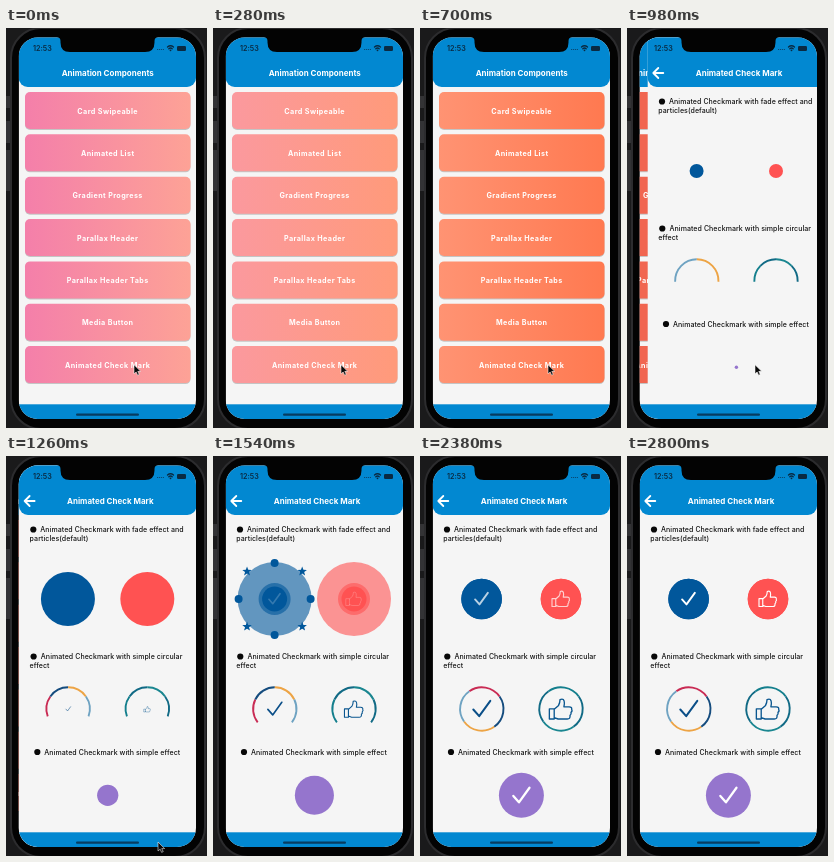
Animation of 201x400 px, one loop 2.94 s. Source, as an HTML page:

```html
<!DOCTYPE html>
<html lang="en">
<head>
<meta charset="utf-8">
<title>Animated components</title>
<style>
html, body { margin: 0; width: 100%; height: 100%; overflow: hidden; background: #1a1a1b; }
svg { display: block; width: 201px; height: 400px; }
text { font-family: Inter, Roboto, sans-serif; }
.title { font-size: 8px; font-weight: 650; fill: #fff; text-anchor: middle; }
.label { font-size: 7.2px; font-weight: 700; letter-spacing: .4px; fill: #fff; text-anchor: middle; }
.note { font-size: 7px; font-weight: 500; letter-spacing: .07px; fill: #111; }
.clock { font-size: 7.2px; font-weight: 600; fill: #0a2a42; }
.line { fill: none; stroke-linecap: round; stroke-linejoin: round; }
</style>
</head>
<body>
<svg viewBox="0 0 201 400">
  <defs>
    <clipPath id="screen"><rect x="12.7" y="9.5" width="177.3" height="381.5" rx="19"/></clipPath>
  </defs>
  <rect x="0" y="68" width="4" height="12" fill="#333335"/>
  <rect x="0" y="93" width="4" height="22" fill="#333335"/>
  <rect x="0" y="122" width="4" height="41" fill="#333335"/>
  <rect x="5" y="0" width="194" height="401" rx="30" fill="#030303" stroke="#2c2c2e" stroke-width="2"/>
  <g clip-path="url(#screen)">
    <g id="pages"></g>
    <rect x="12" y="376.3" width="178" height="15" fill="#0288d1"/>
    <rect x="70" y="385.6" width="63" height="2.2" rx="1.1" fill="#073c60"/>
  </g>
  <path d="M51 9Q54.5 9.5 54.5 13V14.5Q54.5 24 64 24H139Q148.5 24 148.5 14.5V13Q148.5 9.5 152 9Z" fill="#030303"/>
  <text class="clock" x="27" y="23.3">12:53</text>
  <path d="M151 21.5h7" stroke="#0a4a75" stroke-width="1.2" stroke-dasharray="1.2 .8"/>
  <path class="line" d="M161.5 19q3-2.6 6 0M162.8 20.8q1.7-1.5 3.4 0" stroke="#0a2a42" stroke-width="1.3"/>
  <circle cx="164.5" cy="22.3" r=".9" fill="#0a2a42"/>
  <rect x="171" y="18" width="9" height="5" rx="1.3" fill="#0a2a42"/>
  <g id="cursor"></g>
</svg>
<script>
const LOOP = 2940, STEP = 140, LEFT = 12.7, WIDTH = 178;
const BLUE = '#01579b', RED = '#ff5252', PURPLE = '#9575cd';
const LABELS = ['Card Swipeable', 'Animated List', 'Gradient Progress', 'Parallax Header',
  'Parallax Header Tabs', 'Media Button', 'Animated Check Mark'];
const MULTI = ['#c92b54', '#154c7e', '#eda445', '#6fa3c2'];
const TEAL = ['#147f8d', '#116a85', '#1a8690', '#116a85'];
const CHECK = 'M-8.7.5L-2.8 7.2L8.3-8.2';
const THUMB = 'M-12-.5h5v10.5h-5zM-7 0L-2.5-4Q-1-7-1-10Q3.5-12 3.5-6L3-2.5H8.5Q11.5-2.5 11 0Q12 2 10.3 3.2Q11 5 9.3 6.3Q9.8 10 6.5 10H-3L-7 8.5';

// Piecewise linear value through [time, value] pairs, held at both ends
function key(t, ...pts) {
  if (t <= pts[0][0]) return pts[0][1];
  for (let i = 1; i < pts.length; i++) {
    const [a, u] = pts[i - 1], [b, v] = pts[i];
    if (t <= b) return u + (v - u) * (t - a) / (b - a);
  }
  return pts[pts.length - 1][1];
}
const rgb = (t, ...stops) =>
  `rgb(${[0, 1, 2].map(i => key(t, ...stops.map(([at, c]) => [at, c[i]])))})`;
const circle = (x, y, r, fill, alpha = 1) =>
  `<circle cx="${x}" cy="${y}" r="${Math.max(0, r)}" fill="${fill}" opacity="${alpha}"/>`;
const icon = (d, x, y, scale, color, width, alpha = 1) =>
  `<path class="line" d="${d}" transform="translate(${x} ${y}) scale(${scale})" stroke="${color}" stroke-width="${width}" opacity="${alpha}"/>`;
const polar = (x, y, r, deg) => {
  const a = deg * Math.PI / 180;
  return [x + r * Math.sin(a), y - r * Math.cos(a)];
};
const note = (x, y, text) => `<text class="note" x="${x}" y="${y}">${text}</text>`;

function page(title, x, body) {
  return `<rect x="${LEFT}" y="0" width="${WIDTH}" height="400" fill="#f5f5f5"/>
    <rect x="${LEFT}" y="-10" width="${WIDTH - .7}" height="69" rx="9" fill="#0288d1"/>
    <text class="title" x="${x}" y="48">${title}</text>${body}`;
}

function list(t) {
  const left = rgb(t, [0, [244, 127, 170]], [280, [251, 153, 158]], [700, [255, 147, 115]], [980, [243, 106, 84]]);
  const right = rgb(t, [0, [253, 162, 150]], [280, [255, 154, 122]], [700, [255, 121, 80]], [980, [236, 92, 72]]);
  const buttons = LABELS.map((label, i) => {
    const y = 64 + i * 42.35;
    return `<rect x="19" y="${y + 1}" width="165.5" height="37" rx="5" fill="#000" opacity=".2"/>
      <rect x="19" y="${y}" width="165.5" height="37" rx="5" fill="url(#fill)"/>
      <text class="label" x="101.7" y="${y + 21.5}">${label}</text>`;
  });
  return page('Animation Components', 101.7, `<linearGradient id="fill" gradientUnits="userSpaceOnUse" x1="19" x2="184">
    <stop stop-color="${left}"/><stop offset="1" stop-color="${right}"/></linearGradient>` + buttons.join(''));
}

function star(x, y, r) {
  const pts = [...Array(10).keys()].map(i => polar(x, y, i % 2 ? r * .42 : r, i * 36));
  return `<polygon points="${pts.join(' ')}" fill="${BLUE}"/>`;
}

function particles(t, x, y) {
  if (t < 1400 || t >= 1820) return '';
  const dist = 36 + (t - 1540) * .07;
  let out = '';
  for (let i = 0; i < 8; i++) {
    const [px, py] = polar(x, y, i % 2 ? dist + 3 : dist, i * 45);
    out += i % 2 ? star(px, py, 5) : circle(px, py, 4, BLUE);
  }
  return `<g opacity="${key(t, [1540, 1], [1820, .4])}">${out}</g>`;
}

// Growing disc that fades away around a solid core
function burst(t, x, y, color, d, width) {
  const size = key(t, [882, 0], [1400, 37]);
  const core = key(t, [1260, 0], [1540, 16], [1820, 20.3]);
  const inner = key(t, [1260, 0], [1540, 12.5], [1820, 20.3]);
  const shown = key(t, [1400, 0], [1540, .2], [1960, .45], [2800, 1]);
  return circle(x, y, size, color, key(t, [1400, 1], [1540, .6], [1820, 0])) +
    circle(x, y, core, color, key(t, [1540, .6], [1820, 1])) + circle(x, y, inner, color) +
    icon(d, x, y, key(t, [1400, .6], [1820, .75]), '#fff', width, shown);
}

// Ring of four arcs opening from the top, then turning as it closes
function ring(t, x, y, colors) {
  const half = key(t, [840, 50], [980, 92], [1540, 128], [1960, 180]);
  const turn = key(t, [1540, 0], [1960, 145]);
  const span = 2 * half / colors.length;
  return colors.map((color, i) => {
    const a = turn - half + i * span;
    return `<path d="M${polar(x, y, 21.7, a)}A21.7 21.7 0 0 1 ${polar(x, y, 21.7, a + span)}" fill="none" stroke="${color}" stroke-width="1.9"/>`;
  }).join('');
}

function detail(t) {
  const grow = key(t, [1120, 0], [1540, .82], [1820, 1]);
  const dot = key(t, [926, 0], [1633, 22.5]);
  const tick = key(t, [1540, 0], [1820, .8], [1960, .9], [2100, 1]);
  const bullet = (x, y) => circle(x, y, 3.1, '#080808');
  const multi = t < 1200 ? [MULTI[3], MULTI[2]] : MULTI;
  return page('Animated Check Mark', 104,
    icon('M5 0H-5M0-5L-5 0L0 5', 23.3, 45, 1, '#fff', 1.8) +
    bullet(27, 73.5) + note(34, 76, 'Animated Checkmark with fade effect and') + note(23.3, 85, 'particles(default)') +
    bullet(27.3, 200.5) + note(34.5, 203, 'Animated Checkmark with simple circular') + note(23.3, 212, 'effect') +
    bullet(31, 296) + note(38, 298.5, 'Animated Checkmark with simple effect') +
    burst(t, 61.6, 143, BLUE, CHECK, 2.5) + particles(t, 61.6, 143) +
    burst(t, 141, 143, RED, THUMB, 1.5) +
    ring(t, 61.8, 253, multi) + ring(t, 141, 253, TEAL) +
    (grow ? icon(CHECK, 62, 253, grow, '#0b4f88', 2) + icon(THUMB, 141, 253.3, grow * .97, '#0b5790', 1.4) : '') +
    circle(101.4, 339.3, dot, PURPLE) +
    (tick ? icon(CHECK, 101.6, 339.5, tick * .95, '#fff', 2.4, tick) : ''));
}

function cursor(t) {
  if (t >= 1540) return '';
  const x = key(t, [980, 128], [1120, 138], [1260, 152], [1400, 156]);
  const y = key(t, [980, 336.8], [1120, 360], [1260, 386], [1400, 394]);
  return `<path d="M0 0V10L2.4 8L4 11.5L5.8 10.7L4.2 7.3H7.4Z" transform="translate(${x} ${y}) scale(.9)" fill="#080808" stroke="#fff" stroke-width=".6"/>`;
}

function render(t) {
  const gap = 8 * 5 ** ((980 - t) / STEP);
  const offset = t < 840 ? WIDTH : t < 1400 ? gap : 0;
  const shift = -53 * (1 - offset / WIDTH);
  let out = '';
  if (offset) out += `<g transform="translate(${shift})">${list(t)}</g>`;
  if (offset < WIDTH) out += `<g transform="translate(${offset})">${detail(t)}</g>`;
  document.getElementById('pages').innerHTML = out;
  document.getElementById('cursor').innerHTML = cursor(t);
}

let last = -1;
function tick() {
  const t = Math.floor(performance.now() % LOOP / STEP) * STEP;
  if (t !== last) render(last = t);
  requestAnimationFrame(tick);
}
tick();
</script>
</body>
</html>
```
